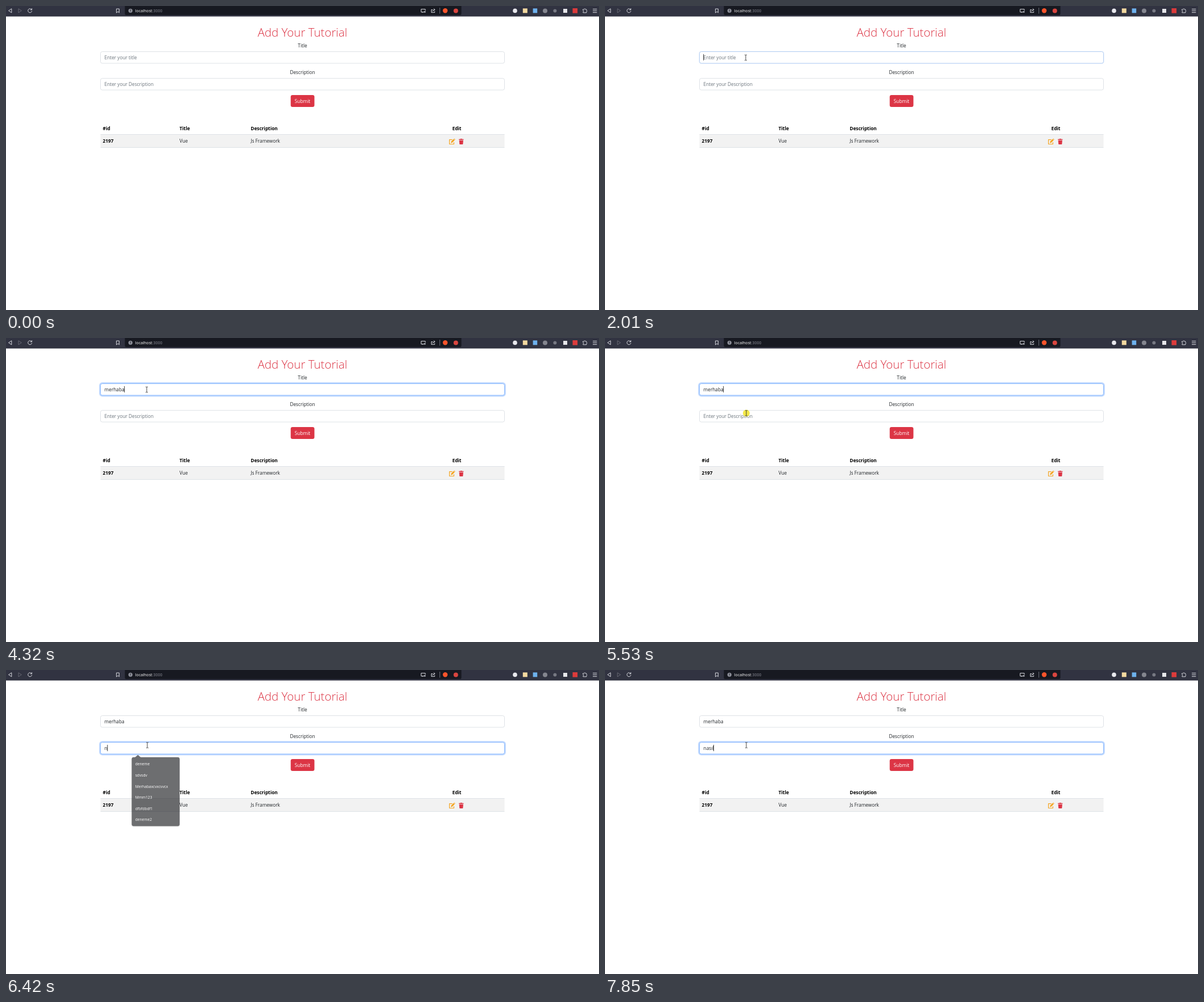
Animation, 1045 px wide and 536 px high, one loop 8 s. Source, as an HTML page:

```html
<!DOCTYPE html>
<html lang="en">
<head>
<meta charset="utf-8">
<title>Add Your Tutorial</title>
<style>
  html, body { margin: 0; width: 100%; height: 100%; overflow: hidden; background: #fff; }
  svg { display: block; width: 1045px; height: 536px; }
  text { font: 8.25px "Open Sans", "Noto Sans", sans-serif; fill: #212529; white-space: pre; }
  .bold { font-weight: 700; fill: #000; }
  .mid { text-anchor: middle; }
  .hint { fill: #6c757d; }
  .heading { font-size: 20.5px; font-weight: 300; fill: #dc3545; }
  .url { font-size: 7.1px; fill: #8d8f99; }
  .url .host { fill: #fff; font-weight: 500; }
  .popup text { font-size: 6.75px; fill: #fff; }
  .line { fill: none; stroke: #d9dae0; stroke-width: 1; stroke-linejoin: round; stroke-linecap: round; }
</style>
</head>
<body>
<svg viewBox="0 0 1045 536" xmlns="http://www.w3.org/2000/svg">
  <rect width="1045" height="536" fill="#fff"/>

  <g id="toolbar">
    <rect width="1045" height="18.5" fill="#313341"/>
    <rect x="209.5" y="-4" width="593" height="20" rx="2.5" fill="#171921"/>
    <path class="line" d="M9.5 5L4.5 8.3L9.5 11.6Z"/>
    <path class="line" d="M22.3 5L27.3 8.3L22.3 11.6Z" stroke-opacity=".3"/>
    <path class="line" d="M45 6.1A3.5 3.5 0 1 0 45.6 9.2M45.6 4.6V6.8H43.3"/>
    <path class="line" d="M195 5H199.4V11.8L197.2 9.8L195 11.8Z"/>
    <circle cx="219.3" cy="8.3" r="3.6" fill="#8d8f99"/>
    <path d="M219.3 6.2V8.6M219.3 9.7V10.5" stroke="#171921"/>
    <text class="url" x="227.8" y="10.9"><tspan class="host">localhost</tspan>:3000</text>
    <path class="line" d="M735 10.8H731.6V5.6H738.9V8M733.5 10.8H736M737.3 9.8H739V11H737.3Z"/>
    <path class="line" d="M751.5 6.5H749.6V11.4H755.4V9.6M751.7 9.4Q752 6.5 755.8 6.4M754 4.9L755.9 6.4L754 8"/>
    <path d="M764.5 3V13.5" stroke="#6a6c77"/>
    <circle cx="774" cy="8.2" r="4.2" fill="#fb542b"/>
    <circle cx="792.7" cy="8.4" r="4" fill="#d9453f"/>
    <circle cx="897" cy="8.4" r="3.8" fill="#e9e9ee"/>
    <rect x="910.8" y="4.3" width="8" height="8" fill="#f3d9a0"/>
    <rect x="928.6" y="4.3" width="7.6" height="8" fill="#6eb2ee"/>
    <circle cx="950" cy="8.4" r="4" fill="#84868f"/>
    <circle cx="967.4" cy="8.4" r="3" fill="#777983"/>
    <rect x="982" y="5" width="7" height="7" fill="#e6e6ea"/>
    <rect x="998.5" y="4" width="8.6" height="8.6" fill="#dc3b3b"/>
    <path class="line" d="M1017 6H1018.7A1.4 1.4 0 0 1 1021.4 6H1022.9V7.7A1.2 1.2 0 0 1 1022.9 10V11.8H1017V10A1.2 1.2 0 0 0 1017 7.7Z"/>
    <path class="line" d="M1034.5 5.5H1041M1034.5 8.5H1041M1034.5 11.5H1041"/>
  </g>

  <text class="heading mid" x="522.5" y="53.8">Add Your Tutorial</text>
  <text class="mid" x="522.5" y="72.5">Title</text>
  <text class="mid" x="522.5" y="119.7">Description</text>
  <g id="fields"></g>
  <rect x="501.7" y="157" width="41.8" height="21" rx="3.3" fill="#dc3545"/>
  <text class="mid" x="522.5" y="170.7" style="fill:#fff">Submit</text>

  <g id="table">
    <rect x="166.5" y="226" width="712" height="23.5" fill="#f2f2f2"/>
    <path d="M166.5 226.5H878.5M166.5 249.5H878.5" stroke="#dee2e6"/>
    <text class="bold" x="170.6" y="218.5">#id</text>
    <text class="bold" x="305.8" y="218.5">Title</text>
    <text class="bold" x="431.3" y="218.5">Description</text>
    <text class="bold mid" x="794.5" y="218.5">Edit</text>
    <text class="bold" x="170.6" y="241.2">2197</text>
    <text x="305.8" y="241.2">Vue</text>
    <text x="431.3" y="241.2">Js Framework</text>
    <path d="M786.5 235.6H781.5V243.5H789.3V240.3" fill="none" stroke="#f5a623" stroke-width="1.2" stroke-linejoin="round"/>
    <path d="M784 241.4L784.4 239L788.8 234.6L790.8 236.6L786.4 241ZM789.3 234.1L790 233.5L791.9 235.4L791.3 236.1Z" fill="#f5a623"/>
    <path d="M798 234.8H800.4L801 234H803.4L804 234.8H806.4V236H798ZM798.6 236.7H805.8L805.3 243.2Q805.2 244 804.4 244H800Q799.2 244 799.1 243.2Z" fill="#dc3545"/>
  </g>

  <g id="popup" class="popup">
    <rect x="220.4" y="153.4" width="86.8" height="123.8" rx="4" fill="#000" opacity=".16"/>
    <path d="M226.5 153.5L232 148.8L237.5 153.5Z" fill="#292a2d"/>
    <rect x="221" y="153" width="85.5" height="123" rx="3.5" fill="#292a2d"/>
  </g>

  <circle id="click" r="6" fill="#f2e639" opacity=".92"/>
  <path id="beam" d="M-2 -4.8H-.6L0 -4.2L.6 -4.8H2M0 -4.2V4.2M-2 4.8H-.6L0 4.2L.6 4.8H2" fill="none" stroke="#333" stroke-width=".9"/>
  <path id="arrow" d="M0 0V9.2L2.1 7.2L3.5 10.4L5 9.8L3.6 6.7H6.5Z" fill="#fff" stroke="#111" stroke-width=".6"/>
</svg>

<script>
const LOOP = 8000;
const $ = id => document.getElementById(id);

function add(parent, tag, attrs, content = '') {
  const node = document.createElementNS('http://www.w3.org/2000/svg', tag);
  for (const name in attrs) node.setAttribute(name, attrs[name]);
  node.textContent = content;
  parent.append(node);
  return node;
}

const set = (node, attrs) => {
  for (const name in attrs) node.setAttribute(name, attrs[name]);
};
const show = (node, visible) => set(node, { visibility: visible ? 'visible' : 'hidden' });

// Value of the last [time, value] step that has been reached.
const stepAt = (steps, t) => steps.reduce((value, s) => t >= s[0] ? s[1] : value, steps[0][1]);
const within = (t, from, to) => t >= from && t < to;
const mix = (a, b, k) => a + (b - a) * k;

function makeField(y, hint, typing, focus, caretFrom, caretTo) {
  const root = $('fields');
  const box = { x: 166.5, y, width: 712, height: 20.5 };
  const ring = add(root, 'rect', { fill: '#0d6efd', 'fill-opacity': .25 });
  const frame = add(root, 'rect', { ...box, rx: 3.2, fill: '#fff' });
  const label = add(root, 'text', { x: 173.6, y: y + 13.4 });
  const caret = add(root, 'rect', { y: y + 4.3, width: .9, height: 11.2, fill: '#222' });

  return (t, blinkOff) => {
    const level = stepAt(focus, t);
    const value = stepAt(typing, t);
    const grow = 2.4 * level;
    set(ring, {
      x: box.x - grow, y: y - grow, rx: 3.2 + grow, opacity: level,
      width: box.width + 2 * grow, height: box.height + 2 * grow
    });
    const rgb = [[222, 134], [226, 183], [230, 254]].map(([a, b]) => Math.round(mix(a, b, level)));
    set(frame, { stroke: `rgb(${rgb})` });
    label.textContent = value || hint;
    set(label, { class: value ? '' : 'hint' });
    set(caret, { x: 173.3 + (value ? label.getComputedTextLength() : 0) });
    show(caret, within(t, caretFrom, caretTo) && !blinkOff);
  };
}

// Each listed time reveals one more letter.
const typed = (word, times) => [[0, ''], ...times.map((time, i) => [time, word.slice(0, i + 1)])];

const fields = [
  makeField(80.5, 'Enter your title',
    typed('merhaba', [2500, 3210, 3310, 3710, 3910, 4110, 4320]),
    [[0, 0], [2010, .45], [2110, 1], [5630, .5], [5730, 0]], 2010, 5630),
  makeField(127.6, 'Enter your Description',
    typed('nasıl', [6420, 6540, 6940, 7550, 7850]),
    [[0, 0], [5630, .55], [5730, 1]], 5630, LOOP)
];
const caretGaps = [[2910, 3210], [4830, 5450], [6120, 6420], [7460, 7550]];

['deneme', 'sdvsdv', 'Merhabaxcvxcvvcx', 'Mmm123', 'dfbfdbdf1', 'deneme2']
  .forEach((word, i) => add($('popup'), 'text', { x: 227.2, y: 167.9 + i * 19.8 }, word));

function pointerAt(t) {
  if (t < 880) {
    const k = Math.floor((t - 100) / 97.5 + .01) / 8;
    const eased = k * k * (3 - 2 * k);
    return [mix(932, 253.5, eased), mix(486, 99.5, eased)];
  }
  return stepAt([
    [880, [253.5, 99.5]], [980, [250.5, 95]], [1080, [248, 92]], [1380, [248, 91]],
    [4930, [248, 97]], [5030, [248, 110]], [5130, [248.5, 125]], [5230, [249, 132.5]]
  ], t);
}

function drawPointer(t) {
  const [x, y] = pointerAt(t);
  const overField = x > 166 && x < 879 && (within(y, 80, 101.5) || within(y, 127, 149));
  const move = { transform: `translate(${x} ${y})` };
  set($('beam'), move);
  set($('arrow'), move);
  set($('click'), move);
  show($('beam'), t >= 100 && overField);
  show($('arrow'), t >= 100 && !overField);
  show($('click'), within(t, 1900, 2010) || within(t, 5530, 5630));
}

function drawPopup(t) {
  const opacity = stepAt([[0, 0], [5630, 1], [6420, .68], [6540, .2], [6640, 0]], t);
  const scale = mix(.96, 1, opacity);
  set($('popup'), {
    opacity,
    transform: `translate(263.7 214.5) scale(${scale}) translate(-263.7 -214.5)`
  });
}

function render(t) {
  const blinkOff = caretGaps.some(([from, to]) => within(t, from, to));
  fields.forEach(draw => draw(t, blinkOff));
  drawPopup(t);
  drawPointer(t);
}

const start = performance.now();
function tick() {
  render((performance.now() - start) % LOOP);
  requestAnimationFrame(tick);
}
tick();
</script>
</body>
</html>
```
